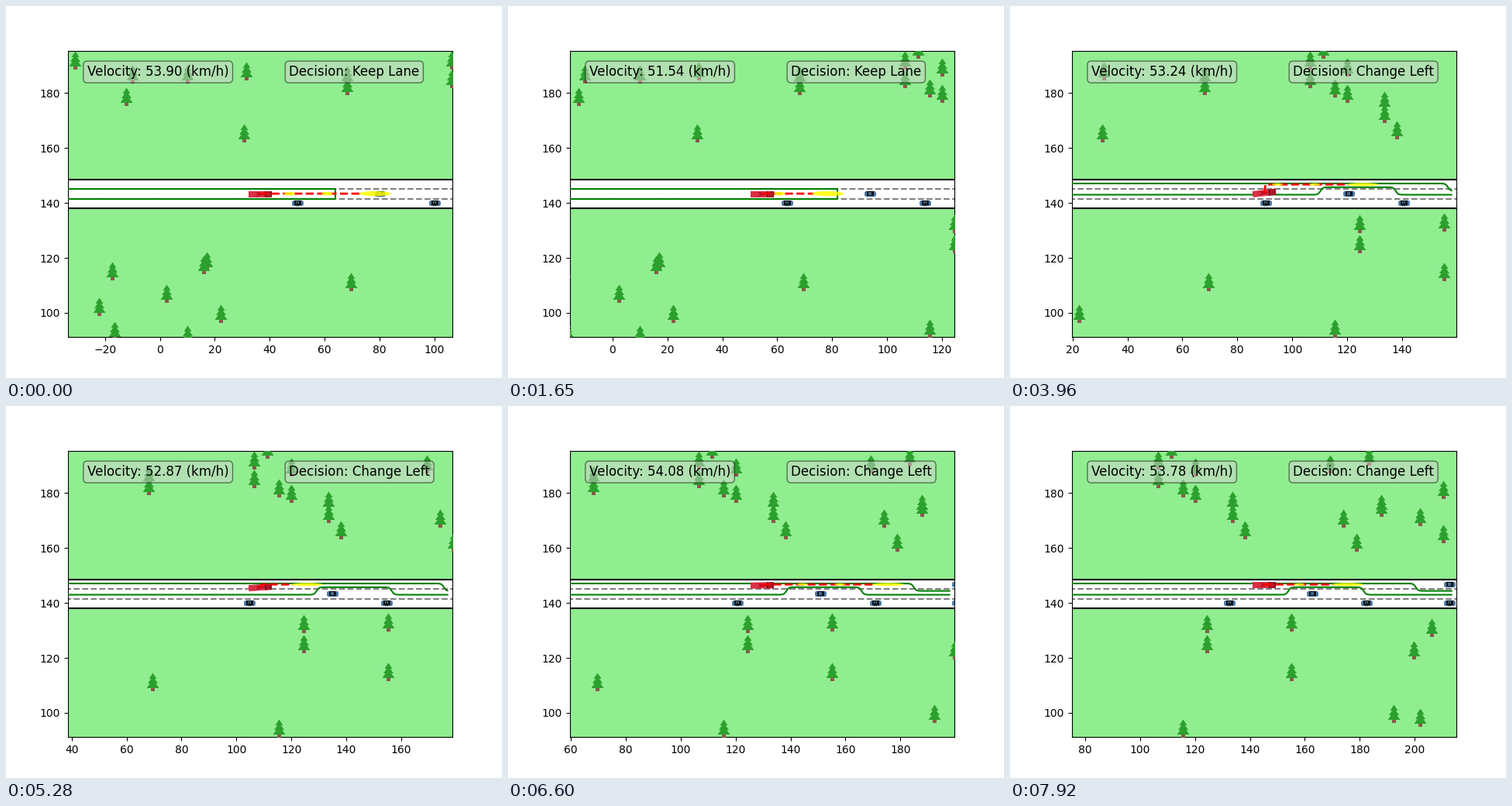
Write a matplotlib script that moves like this. It is 640x480 px and loops after 8 s.

```python
import numpy as np
import matplotlib.pyplot as plt
from matplotlib.animation import FuncAnimation
from matplotlib.patches import Ellipse, Polygon
from matplotlib.path import Path
from matplotlib.ticker import MultipleLocator

TICK_MS, LOOP_MS, STEP_MS = 40, 8000, 330
LAST = LOOP_MS // STEP_MS
HALF_W, HALF_H, MID_Y = 70, 52.16, 143.32
UNIT = 496 / 140                      # pixels per metre
START_X, LANE, LEFT_LANE = 36.55, 143.25, 146.75
CHANGE, REPLAN = 11, 20               # steps where the plan is renewed

# tree columns: x and the heights of the trees standing there
TREES = [
    (-30.9, 191.9), (-22.2, 102.2), (-17.4, 115.1), (-16.5, 93.4), (-12.3, 178.7),
    (-10, 187), (2.4, 106.9), (9.9, 187, 92), (15.9, 117.4), (17.1, 118.9),
    (22.2, 99.7), (30.7, 165.4), (31.5, 188), (68.1, 182.6, 186.7), (69.5, 111.2),
    (106.4, 191.9, 185.1), (111.2, 195.8), (115.5, 181.7, 94.4),
    (120, 189.4, 179.8), (124.4, 132.4, 125), (133.5, 177.2, 172.6), (138.1, 166.5),
    (155.2, 132.9, 115), (169.2, 190.5), (174, 170.7), (178.8, 162), (183.3, 193.3),
    (187.8, 174.9, 176.3), (192.3, 99.8), (199.7, 122.8), (201.9, 171.3, 98.2),
    (206.2, 130.9), (210.4, 181.2, 165.1),
]
CARS = np.array([(50, 140), (100, 140), (130, 140), (80, 143.4), (130, 146.8)])

fig = plt.figure(figsize=(6.4, 4.8), dpi=100)
ax = fig.add_subplot()
ax.set_facecolor("lightgreen")
ax.set_ylim(MID_Y - HALF_H, MID_Y + HALF_H)
ax.xaxis.set_major_locator(MultipleLocator(20))
ax.yaxis.set_major_locator(MultipleLocator(20))


def glyphs(points, color, zorder):
    """Pixel-sized shape, stamped at any number of data positions."""
    pts = np.array(points + points[:1], float)
    size = 2 * np.abs(pts).max() * 72 / fig.dpi
    return ax.plot([], [], ls="", marker=Path(pts), ms=size, color=color,
                   mew=0, zorder=zorder)[0]


def box(x0, x1, h):
    return [(x0, -h), (x1, -h), (x1, h), (x0, h)]


def ego_x(step):
    return np.interp(step, [0, 4, 9, 12, 16, 19, 20, 21, 24],
                     [START_X, 49.95, 72.8, 89.8, 108.65, 122.24, 129.68, 131.83, 145.2])


def ego_y(step):
    s = max(step - CHANGE, 0)
    return LANE + 3.3 * (1 - np.exp(-s ** 1.465 / 8))


def speed(step):
    return np.interp(step, [0, 5, 9, 12, 16, 20, 24],
                     [53.90, 51.54, 53.85, 53.24, 52.87, 54.08, 53.78])


# road
ax.fill_between([-1000, 1000], 138, 148.5, color="white", lw=0, zorder=1)
for y in (138, 148.5):
    ax.plot([-1000, 1000], [y, y], "k-", lw=1.5, zorder=2)
for y in (141.5, 145):
    ax.plot([-1000, 1000], [y, y], "--", color="gray", lw=1.5, zorder=2)

# trees: a trunk and three stacked triangles
spots = [(x, y) for x, *ys in TREES for y in ys]
trunk = [(-2.5, -12), (2.5, -12), (2.5, -6), (-2.5, -6)]
tiers = [[(0, 12 - 4 * i), (5 + 1.5 * i, 4.5 - 6 * i), (-5 - 1.5 * i, 4.5 - 6 * i)]
         for i in range(3)]
for shape, color in [(trunk, "tab:brown")] + [(t, "tab:green") for t in tiers]:
    glyphs(shape, color, 3).set_data(*zip(*spots))

# other cars: rounded body, dark windows, light roof
turn = np.linspace(0, 2 * np.pi, 24, endpoint=False)
body = [(7.5 * np.sign(c) * abs(c) ** .5, 3.8 * np.sign(s) * abs(s) ** .5)
        for c, s in zip(np.cos(turn), np.sin(turn))]
car_parts = [glyphs(body, "#4d79a8", 4), glyphs(box(-4.5, 5, 3), "#101418", 4),
             glyphs(box(-2, 1.5, 2), "#4a6a85", 4)]
star, = ax.plot([], [], "*", color="#10180f", ms=5.5, mew=0, zorder=4)

corridor = [ax.plot([], [], "g-", lw=1.5, zorder=5)[0] for _ in range(2)]

# own car: outline in pixels, colour
EGO = [(box(-15, 15, 4), "#d92f45"), (box(6, 15, 4), "#b3162b"),
       (box(6, 7.2, 3.5), "#3a0a10"), (box(13.5, 14.5, 3.5), "#5c0c16"),
       ([(-6, -3), (9, 0), (-6, 3), (-3, 0)], "#c01025")]
ego_parts = [ax.add_patch(Polygon(p, fc=c, lw=0, zorder=6)) for p, c in EGO]

# planned path with a long glow at its end and two short ones before
plan, = ax.plot([], [], "r--", lw=2, zorder=7)
GLOW = [(5.5, 11.5, 1.8), (23, 4, 1.3), (36.6, 4, 1.3)]     # distance to end, size
glow = [ax.add_patch(Ellipse((0, 0), w, h, fc="yellow", alpha=.85, lw=0, zorder=8))
        for _, w, h in GLOW]

style = dict(transform=ax.transAxes, fontsize=12, va="top", zorder=10,
             bbox=dict(boxstyle="round", facecolor="lightgray", alpha=0.5))
speed_text = ax.text(0.05, 0.95, "", **style)
choice_text = ax.text(0.575, 0.95, "", **style)


def set_corridor(x, step):
    if step < CHANGE:
        end = x + 27.5
        corridor[0].set_data([-1000, end, end, -1000], [145, 145, 141.5, 141.5])
        corridor[1].set_data([], [])
        return
    rise = x + (20.5 if step < 18 else 8.8)
    xs = np.linspace(x - 80, x + 68.2, 500)

    def ramp(c):
        return (1 + np.tanh((xs - c) / 0.9)) / 2

    corridor[0].set_data(xs, 147.1 - 2.7 * ramp(rise + 46.4))
    corridor[1].set_data(xs, 143 + 2.75 * (ramp(rise) - ramp(rise + 27.4)))


def set_plan(x, y, step):
    changing = step >= CHANGE
    end = 83.9 if not changing else 131.2 if step < REPLAN else 181
    path_y = LEFT_LANE if changing else 143.4
    tail = end - 10.5
    ahead = x < tail
    plan.set_data([x, x + 0.5, tail] if ahead else [],
                  [y, path_y, path_y] if ahead else [])
    for patch, (back, _, h) in zip(glow, GLOW):
        patch.set_center((end - back, path_y))
        patch.set_height(h * (0.65 if changing else 1))
        patch.set_visible(end - back > x + 4)


def draw(tick):
    step = min((tick * TICK_MS + 30) // STEP_MS, LAST)
    x, y = ego_x(step), ego_y(step)
    ax.set_xlim(x - HALF_W, x + HALF_W)

    cars = CARS + [0.76 * (x - START_X), 0]
    for part in car_parts:
        part.set_data(*cars.T)
    star.set_data(cars[:3, 0], cars[:3, 1] - 0.45)

    a = np.arctan2(ego_y(step + .5) - ego_y(step - .5), 4.7)
    rot = np.array([[np.cos(a), np.sin(a)], [-np.sin(a), np.cos(a)]])
    for part, (points, _) in zip(ego_parts, EGO):
        part.set_xy(np.array(points) @ rot / UNIT + (x, y))

    set_corridor(x, step)
    set_plan(x, y, step)
    speed_text.set_text(f"Velocity: {speed(step):.2f} (km/h)")
    choice_text.set_text("Decision: " + ("Change Left" if step >= CHANGE else "Keep Lane"))
    return []


anim = FuncAnimation(fig, draw, frames=LOOP_MS // TICK_MS, interval=TICK_MS,
                     repeat=True, repeat_delay=0)
plt.show()
```
